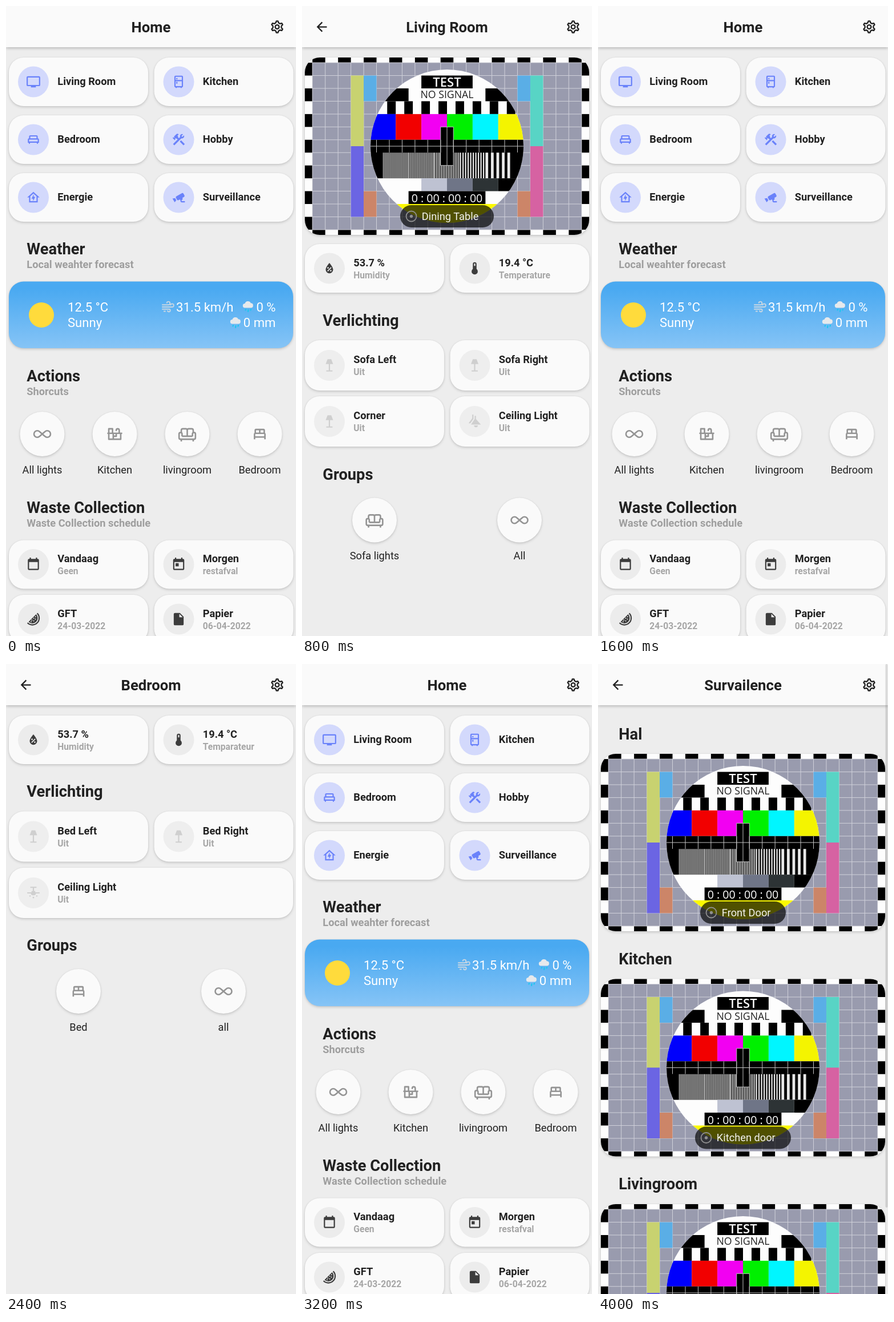
These frames come from a looping animation (508 by 1101 pixels, 4800 ms). An HTML page:

```html
<!DOCTYPE html>
<html lang="en">
<head>
<meta charset="utf-8">
<title>Home dashboard</title>
<style>
html, body { margin: 0; width: 100%; height: 100%; overflow: hidden; background: #eee; }
svg { display: block; width: 100vw; height: 100vh; }
text { font-family: Roboto, sans-serif; fill: #212121; }
.title { font-size: 25.7px; font-weight: 700; text-anchor: middle; }
.head { font-size: 27.3px; font-weight: 700; }
.lead { font-size: 18.24px; font-weight: 700; fill: #9e9e9e; }
.name { font-size: 18.24px; font-weight: 700; }
.state { font-size: 15.63px; font-weight: 700; fill: #a6a6a6; }
.label { font-size: 18.24px; text-anchor: middle; }
.sky { font-size: 22.1px; fill: #fff; }
.right { text-anchor: end; }
.pill { font-size: 18.24px; fill: #f2f2f2; }
.tv { font-family: "Open Sans", "Noto Sans", sans-serif; text-anchor: middle; }
.card { fill: #fafafa; }
.raised { filter: drop-shadow(0 2px 2px rgba(0,0,0,.15)) drop-shadow(0 0 1px rgba(0,0,0,.08)); }
.bar { fill: #fafafa; filter: drop-shadow(0 2px 2.5px rgba(0,0,0,.22)); }
.page { visibility: hidden; animation: show 4.8s step-end infinite; }
#living { animation-delay: -4s; }
#bedroom { animation-delay: -2.4s; }
#cameras { animation-delay: -.8s; }
@keyframes show {
  0% { visibility: visible; }
  16.666%, 100% { visibility: hidden; }
}
</style>
</head>
<body>
<svg id="stage" viewBox="0 0 508 1101" preserveAspectRatio="none">
  <defs>
    <linearGradient id="blue" x1="0" y1="0" x2="0" y2="1">
      <stop offset="0.1" stop-color="#49a9f1"/><stop offset="1" stop-color="#86c4f6"/>
    </linearGradient>
    <clipPath id="frame"><rect x="-249" y="-155" width="498" height="310" rx="26"/></clipPath>
    <clipPath id="disc"><circle r="134"/></clipPath>
    <g id="testcard"></g>
    <g id="rain">
      <path fill="#e6e9ec" d="M4 12a3.700 3.700 0 0 1 0-7.400a5.500 5.500 0 0 1 10.300-.8a4.100 4.100 0 0 1 0 8.200z"/>
      <path stroke="#1fc6f0" stroke-width="2.200" stroke-linecap="round" d="M5.500 14.500l-.5 1.500M10 15.500l-.5 3M14.500 14.500l-.5 1.500"/>
    </g>
  </defs>
  <g id="home"></g>
  <g id="living" class="page"></g>
  <g id="bedroom" class="page"></g>
  <g id="cameras" class="page"></g>
</svg>
<script>
const dot = (x, y, r) => `M${x - r} ${y}a${r} ${r} 0 1 0 ${2 * r} 0a${r} ${r} 0 1 0 ${-2 * r} 0`;

// Outline of a gear with six teeth, centred in a 24 unit box
function gear() {
  const pts = [];
  for (let k = 0; k < 6; k++)
    for (const [a, r] of [[-18, 6.6], [-8, 9], [8, 9], [18, 6.6]]) {
      const t = (k * 60 + a) * Math.PI / 180;
      pts.push((12 + r * Math.sin(t)).toFixed(2) + ' ' + (12 - r * Math.cos(t)).toFixed(2));
    }
  return 'M' + pts.join('L') + 'Z' + dot(12, 12, 3);
}

const calendar = 'M19 19H5V8H19ZM16 1V3H8V1H6V3H5A2 2 0 0 0 3 5V19A2 2 0 0 0 5 21H19A2 2 0 0 0 21 19V5A2 2 0 0 0 19 3H18V1Z';

const solid = {
  tv: 'M21 17H3V5H21ZM21 3H3A2 2 0 0 0 1 5V17A2 2 0 0 0 3 19H8V21H16V19H21A2 2 0 0 0 23 17V5A2 2 0 0 0 21 3Z',
  fridge: 'M9 21V22H7V21A2 2 0 0 1 5 19V4A2 2 0 0 1 7 2H17A2 2 0 0 1 19 4V19A2 2 0 0 1 17 21V22H15V21ZM7 4V9H17V4ZM7 19H17V11H7ZM8 12H10V15H8ZM8 6H10V8H8Z',
  bed: 'M19 10V7A2 2 0 0 0 17 5H7A2 2 0 0 0 5 7V10A2 2 0 0 0 3 12V17H4.300L5 19H6L6.700 17H17.300L18 19H19L19.700 17H21V12A2 2 0 0 0 19 10ZM7 7H17V10H7ZM5 12H19V15H5Z',
  twin: 'M19 10.200V7A2 2 0 0 0 17 5H7A2 2 0 0 0 5 7V10.200A3 3 0 0 0 4 12.400V19H6V17H18V19H20V12.400A3 3 0 0 0 19 10.200ZM7 7H11V10H7ZM13 7H17V10H13ZM6 12H18V15H6Z',
  tools: 'M13.780 15.300L19.780 21.300L21.890 19.140L15.890 13.140ZM17.500 10.100Q16.900 10.100 16.360 9.910L4.970 21.250L2.860 19.140L10.270 11.740L8.500 9.960L7.780 10.660L6.330 9.250V12.110L5.630 12.810L2.110 9.250L2.810 8.550H5.620L4.220 7.140L7.780 3.580A3 3 0 0 1 12 3.580L9.890 5.740L11.300 7.140L10.590 7.850L12.380 9.630L14.200 7.750A3.500 3.500 0 0 1 19.080 3.530L16.410 6.200L17.910 7.700L20.580 5.030A3.500 3.500 0 0 1 17.500 10.100Z',
  energy: 'M12 5.690L17 10.190V18H7V10.190ZM12 3L2 12H5V20H19V12H22ZM11.500 18V14H9L12.500 7V11H15Z',
  cctv: 'M18.150 4.940Q17.500 4.900 17 5.200L8.350 10.200A2 2 0 0 0 7.620 12.940L9.120 15.530A2 2 0 0 0 11.850 16.270L13.650 15.230Q14.100 16 14.810 16.270V18.040A2 2 0 0 0 16.810 20H22V18.040H16.810V16.270A2.500 2.500 0 0 0 17.970 12.730L20.500 11.270A2 2 0 0 0 21.240 8.530L19.740 5.940Q19.200 5 18.150 4.940ZM6.220 13.170L2 13.870L5.500 19.930L8.220 16.630Z',
  arrow: 'M20 11V13H8L13.500 18.500L12.080 19.920L4.160 12L12.080 4.080L13.500 5.500L8 11Z',
  day: calendar,
  tomorrow: calendar + 'M7 10H12V15H7Z',
  melon: 'M18.800 1.800A12 12 0 0 1 1.800 18.800L3.200 17.400A10 10 0 0 0 17.400 3.200ZM16.400 4.200A8.600 8.600 0 0 1 4.200 16.400Z'
    + [[15.5, 8], [12.5, 10.5], [15.3, 12], [9.5, 13.5], [12.5, 14.8], [8.3, 16.1]].map(p => dot(...p, .9)).join(''),
  file: 'M13 9V3.500L18.500 9ZM6 2A2 2 0 0 0 4 4V20A2 2 0 0 0 6 22H18A2 2 0 0 0 20 20V8L14 2Z',
  drop: 'M12 3.250C12 3.250 6 10 6 14A6 6 0 0 0 18 14C18 10 12 3.250 12 3.250ZM14.470 9.970L15.530 11.030L9.530 17.030L8.470 15.970Z' + dot(9.75, 11.25, 1.25) + dot(14.25, 15.75, 1.25),
  thermo: 'M15 13V5A3 3 0 0 0 9 5V13A5 5 0 1 0 15 13ZM12 4A1 1 0 0 1 13 5V8H11V5A1 1 0 0 1 12 4Z',
  lamp: 'M9 2H15L18 10H13V20H17V22H7V20H11V10H6Z',
  pendants: 'M12 3H14V8L22 17H6L12 8ZM11 18.500H17A3 3 0 0 1 11 18.500ZM8 1H10V8L5 15H2L8 7Z',
  fan: 'M7 2H17V4H13V9H15V11H22V13H16A4 3 0 0 1 8 13H2V11H9V9H11V4H7Z' + dot(6.5, 17, 1.1) + dot(12, 19.5, 1.3) + dot(17.5, 17, 1.1)
};

const lined = {
  cog: gear(),
  loop: 'M8.500 15A4.400 4.400 0 1 1 8.500 9L15.500 15A4.400 4.400 0 1 0 15.500 9Z',
  counter: 'M2 11H22M4 11V19H20V11M10 11V19M14 11V15H10M4 10V5H9V10M18 11V7A2 2 0 0 0 14 7V8',
  sofa: 'M4 10V7a2 2 0 0 1 2-2h4a2 2 0 0 1 2 2a2 2 0 0 1 2-2h4a2 2 0 0 1 2 2v3M12 7V15M5 15H19M5 15V12a2 2 0 0 0-4 0v5a2 2 0 0 0 2 2h18a2 2 0 0 0 2-2v-5a2 2 0 0 0-4 0v3M4 19v3M20 19v3',
  wind: 'M1 8H13a3 3 0 1 0-3-3M1 12H20a3 3 0 1 0-3-3M1 16H14a2.500 2.500 0 1 1-2.500 2.500M4 20H8'
};

const text = (s, x, y, cls, more = '') => `<text x="${x}" y="${y}" class="${cls}" ${more}>${s}</text>`;
const rect = (x, y, w, h, more) => `<rect x="${x}" y="${y}" width="${w}" height="${h}" ${more}/>`;
const circle = (x, y, r, more) => `<circle cx="${x}" cy="${y}" r="${r}" ${more}/>`;

function icon(name, x, y, size, color) {
  const paint = solid[name]
    ? `fill="${color}" fill-rule="evenodd"`
    : `fill="none" stroke="${color}" stroke-width="2" stroke-linejoin="round"`;
  return `<path d="${solid[name] || lined[name]}" ${paint} transform="translate(${x} ${y}) scale(${size / 24}) translate(-12 -12)"/>`;
}

function header(title, back) {
  return rect(0, 0, 508, 1101, 'fill="#ededed"') + rect(0, 0, 508, 72, 'class="bar"')
    + text(title, 254, 45.5, 'title') + icon('cog', 475, 36.5, 27.5, '#212121')
    + (back ? icon('arrow', 34.5, 36.5, 27, '#212121') : '');
}

const blueTone = ['#d3d9fc', '#6a82fa'], darkTone = ['#ececec', '#3c3c3c'], offTone = ['#eeeeee', '#cfcfcf'];

function tile(col, y, h, pic, tone, name, state, w = 244) {
  const x = col ? 259.500 : 5, mid = y + h / 2;
  return rect(x, y, w, h, 'rx="26" class="card raised"')
    + circle(x + 43, mid, 27, `fill="${tone[0]}"`) + icon(pic, x + 43, mid, 26, tone[1])
    + text(name, x + 85.3, state ? mid - 3.8 : mid + 5.7, 'name')
    + (state ? text(state, x + 85.3, mid + 17, 'state') : '');
}

const button = (x, y, pic, label) => circle(x, y, 39, 'class="card raised"')
  + icon(pic, x, y, 31.3, '#949494') + text(label, x, y + 68.5, 'label');

const heading = (s, y, lead) => text(s, 36.3, y, 'head') + (lead ? text(lead, 36.3, y + 24.5, 'lead') : '');

// Test picture, centred on the origin and laid out in grid cells
function testcard() {
  const c = 22.45;
  const box = (x0, y0, x1, y1, fill) => rect(x0 * c, y0 * c, (x1 - x0) * c, (y1 - y0) * c, `fill="${fill}"`);
  let edge = rect(-249, -155, 498, 310, 'fill="#fdfdfd"'), grid = '', disc = '';
  for (let i = -10; i < 11; i += 2) edge += box(i - .5, -7, i + .5, 7, '#000');
  for (let j = -6; j < 7; j += 2) edge += box(-11.2, j - .5, 11.2, j + .5, '#000');
  edge += box(-10.5, -6.5, 10.5, 6.5, '#999bae');

  for (let i = -10.5; i < 11; i++) grid += `M${i * c} ${-6.5 * c}V${6.5 * c}`;
  for (let j = -6.5; j < 7; j++) grid += `M${-10.5 * c} ${j * c}H${10.5 * c}`;
  grid = `<path d="${grid}" stroke="#d0d1da"/>`;

  const sides = box(-7.5, -5.5, -6.5, 0, '#c8d270') + box(-7.5, 0, -6.5, 5.5, '#6b65e3')
    + box(6.5, -5.5, 7.5, 0, '#58d4c5') + box(6.5, 0, 7.5, 5.5, '#d662a2')
    + [-6.5, 5.5].map(x => box(x, -5.5, x + 1, -3.5, '#5aaee6') + box(x, 3.5, x + 1, 5.5, '#cc8568')).join('');

  disc += box(-6, -6, 6, 6, '#fdfdfd') + box(-6, -4.5, -3, -3.5, '#000') + box(3, -4.5, 6, -3.5, '#000');
  for (let i = -7; i < 9; i += 2) disc += box(i * 2 / 3, -3.5, (i + 1) * 2 / 3, -2.5, '#000');
  ['#0000fc', '#f20000', '#f200f2', '#00f000', '#00f6ff', '#f4f400'].forEach((f, i) => {
    disc += box(i * 2 - 6, -2.5, i * 2 - 4, -.5, f);
  });
  disc += box(-6, -.5, 6, 2.5, '#000');
  let ticks = 'M-134 0H134';
  for (let i = -5.5; i < 6; i++) ticks += `M${i * c} -11V11`;
  [1.9, 2.4, 3, 4.5, 9.6].forEach((p, i) => {
    const x = (i * 2 - 5) * c;
    disc += `<path d="M${x} ${1.5 * c}h${2 * c}" stroke="#e8e8e8" stroke-width="${2 * c}" stroke-dasharray="${p / 2}"/>`;
  });
  disc += box(-.5, -1.5, .5, 1.5, '#000')
    + `<path d="${ticks}M0 ${-1.5 * c}v${3 * c}M${-.5 * c} ${-1.5 * c}h${c}v${3 * c}h${-c}z" fill="none" stroke="#c4c4c4"/>`;
  ['#bec2d2', '#6f7587', '#2d3335', '#000'].forEach((f, i) => {
    disc += box(i * 2 - 2, 2.5, i * 2, 3.5, f);
  });
  disc += box(-6, 4.5, 6, 6, '#fbf900') + box(-2, -5.5, 2, -4.5, '#000') + box(-3, 3.5, 3, 4.5, '#000')
    + text('TEST', 0, -104.500, 'tv', 'style="font-size:22px;font-weight:600;fill:#fff"')
    + text('NO SIGNAL', 0, -84, 'tv', 'style="font-size:17.7px;font-weight:500"')
    + text('0 : 00 : 00 : 00', 0, 98, 'tv', 'style="font-size:19.6px;font-weight:500;fill:#fff"');

  return `<g clip-path="url(#frame)">${edge}${grid}${sides}<g clip-path="url(#disc)">${disc}</g></g>`;
}

function camera(y, label, w) {
  const x = 254 - w / 2, mid = y + 277.5;
  return rect(5, y, 498, 310, 'rx="26" class="card raised"')
    + `<use href="#testcard" x="254" y="${y + 155}"/>`
    + rect(x, mid - 19.5, w, 39, 'rx="19.5" fill="#000" fill-opacity=".68"')
    + circle(x + 19.5, mid, 9, 'fill="none" stroke="#8f8f8f" stroke-width="1.8"')
    + circle(x + 19.5, mid, 2.7, 'fill="#8f8f8f"')
    + text(label, x + 37.8, mid + 6.4, 'pill');
}

const rain = (x, y) => `<use href="#rain" x="${x}" y="${y}"/>`;
const put = (id, ...parts) => document.getElementById(id).innerHTML = parts.join('');

put('testcard', testcard());

put('home', header('Home'),
  tile(0, 90, 85, 'tv', blueTone, 'Living Room'), tile(1, 90, 85, 'fridge', blueTone, 'Kitchen'),
  tile(0, 191, 85, 'bed', blueTone, 'Bedroom'), tile(1, 191, 85, 'tools', blueTone, 'Hobby'),
  tile(0, 292, 85, 'energy', blueTone, 'Energie'), tile(1, 292, 85, 'cctv', blueTone, 'Surveillance'),
  heading('Weather', 433.5, 'Local weahter forecast'),
  rect(5, 481.5, 498, 116.5, 'rx="26" fill="url(#blue)" class="raised"'),
  circle(62, 540, 22, 'fill="#ffdb3c"'),
  text('12.5 °C', 108, 533.5, 'sky'), text('Sunny', 108, 561, 'sky'),
  icon('wind', 283.5, 526, 22.5, '#c6d6e3'), text('31.5 km/h', 398.5, 533.5, 'sky right'),
  rain(414.5, 515.5), text('0 %', 472.5, 533.5, 'sky right'),
  rain(392.5, 543.5), text('0 mm', 472.5, 561, 'sky right'),
  heading('Actions', 655.5, 'Shorcuts'),
  button(63.5, 748, 'loop', 'All lights'), button(190.5, 748, 'counter', 'Kitchen'),
  button(317.5, 748, 'sofa', 'livingroom'), button(444.5, 748, 'twin', 'Bedroom'),
  heading('Waste Collection', 885.5, 'Waste Collection schedule'),
  tile(0, 933.5, 85, 'day', darkTone, 'Vandaag', 'Geen'),
  tile(1, 933.5, 85, 'tomorrow', darkTone, 'Morgen', 'restafval'),
  tile(0, 1029, 85, 'melon', darkTone, 'GFT', '24-03-2022'),
  tile(1, 1029, 85, 'file', darkTone, 'Papier', '06-04-2022'));

put('living', header('Living Room', true), camera(90, 'Dining Table', 164),
  tile(0, 416, 85, 'drop', darkTone, '53.7 %', 'Humidity'),
  tile(1, 416, 85, 'thermo', darkTone, '19.4 °C', 'Temperature'),
  heading('Verlichting', 558.5),
  tile(0, 584, 88, 'lamp', offTone, 'Sofa Left', 'Uit'),
  tile(1, 584, 88, 'lamp', offTone, 'Sofa Right', 'Uit'),
  tile(0, 682, 88, 'lamp', offTone, 'Corner', 'Uit'),
  tile(1, 682, 88, 'pendants', offTone, 'Ceiling Light', 'Uit'),
  heading('Groups', 827.8),
  button(127, 898.5, 'sofa', 'Sofa lights'), button(381, 898.5, 'loop', 'All'));

put('bedroom', header('Bedroom', true),
  tile(0, 90, 85, 'drop', darkTone, '53.7 %', 'Humidity'),
  tile(1, 90, 85, 'thermo', darkTone, '19.4 °C', 'Temparateur'),
  heading('Verlichting', 231.8),
  tile(0, 257.5, 88, 'lamp', offTone, 'Bed Left', 'Uit'),
  tile(1, 257.5, 88, 'lamp', offTone, 'Bed Right', 'Uit'),
  tile(0, 356, 88, 'fan', offTone, 'Ceiling Light', 'Uit', 498),
  heading('Groups', 501.2),
  button(127, 572, 'twin', 'Bed'), button(381, 572, 'loop', 'all'));

put('cameras', header('Survailence', true),
  heading('Hal', 131.5), camera(157, 'Front Door', 150),
  heading('Kitchen', 524.8), camera(550.5, 'Kitchen door', 168),
  heading('Livingroom', 918.2), camera(944, 'Livingroom', 150),
  rect(503.5, 0, 4, 950, 'rx="2" fill="#000" fill-opacity=".13"'));
</script>
</body>
</html>
```
